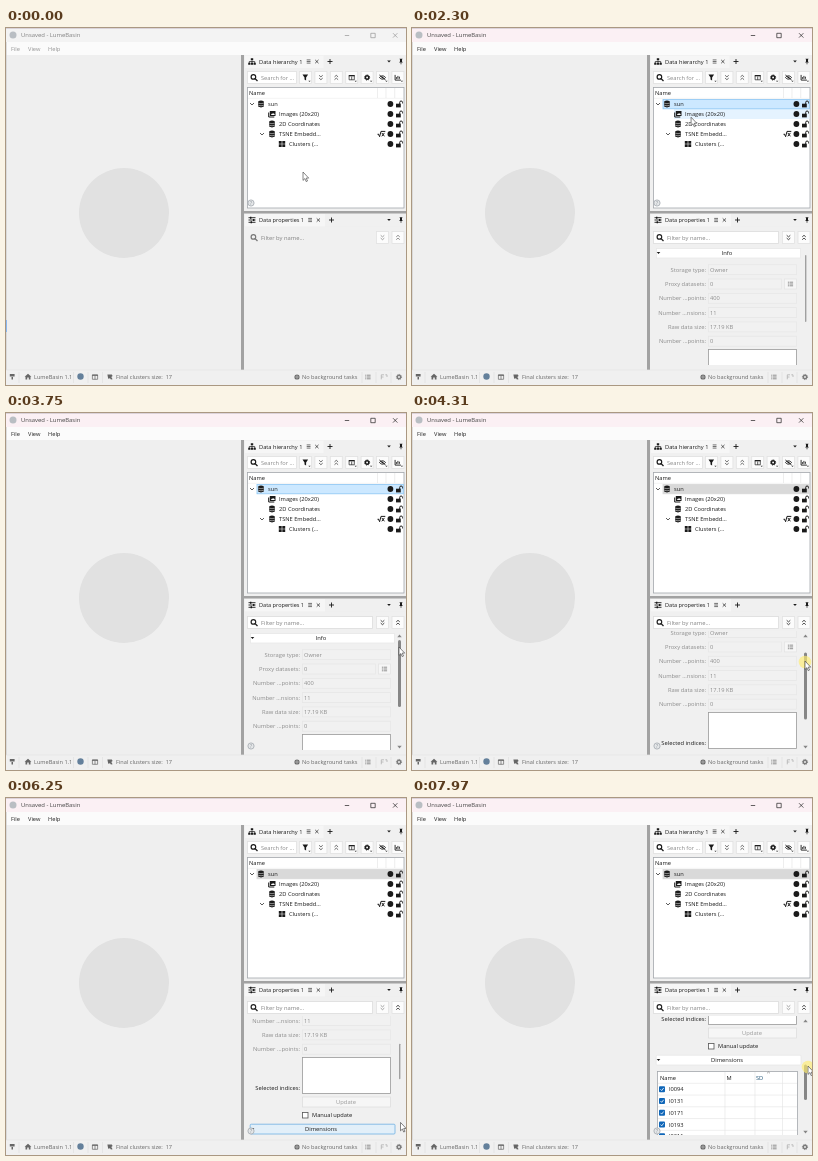
An HTML page for the animation above (8000 ms loop, 400 by 357 pixels).

```html
<!DOCTYPE html>
<html lang="en">
<head>
<meta charset="utf-8">
<title>Data viewer</title>
<style>
html, body { margin: 0; width: 100%; height: 100%; overflow: hidden; background: #f0f0f0; }
svg { display: block; width: 100%; height: 100%; --bar: #f3f3f3; --menu: #959595; --title: #808080; --act: #777; --field: #f0f0f0; --edge: #f0f0f0; }
svg.on { --bar: #fbf0f4; --menu: #222; --title: #444; --act: #222; --field: #fff; --edge: #dcdcdc; }
svg .live, svg.on .idle { display: none; }
svg.on .live { display: inline; }
text { font-family: "Open Sans", "Noto Sans", sans-serif; white-space: pre; }
</style>
</head>
<body>
<svg id="stage" viewBox="0 0 400 357" xmlns="http://www.w3.org/2000/svg"></svg>
<script>
const LOOP = 8000;
const VIEW = { top: 218, height: 119 };
const TRACK_TOP = 227;
const INK = '#1a1a1a', DIM = '#8c8c8c';

// ---- drawing helpers ----
const rect = (x, y, w, h, fill, stroke, more = '') => stroke
  ? `<rect x="${x + .5}" y="${y + .5}" width="${w - 1}" height="${h - 1}" style="fill:${fill};stroke:${stroke}" stroke-width=".8" ${more}/>`
  : `<rect x="${x}" y="${y}" width="${w}" height="${h}" style="fill:${fill}" ${more}/>`;
const text = (x, y, s, fill = INK, size = 5.7, anchor = 'start') =>
  `<text x="${x}" y="${y + 2.1}" font-size="${size}" text-anchor="${anchor}" style="fill:${fill}">${s}</text>`;
const path = (d, color = INK, width = 1, fill = 'none') =>
  `<path d="${d}" style="stroke:${color};fill:${fill}" stroke-width="${width}"/>`;
const shape = (d, color = INK) => `<path d="${d}" style="fill:${color}"/>`;
const dot = (x, y, r, fill = INK) => `<circle cx="${x}" cy="${y}" r="${r}" fill="${fill}"/>`;
const at = (x, y, body, more = '') => `<g transform="translate(${x} ${y})" ${more}>${body}</g>`;

// ---- icons, each centred on 0,0 ----
const icon = {
  search: c => `<circle cx="-.6" cy="-.6" r="2.3" fill="none" style="stroke:${c}" stroke-width="1.2"/>` + path('M1.1 1.1L3.5 3.5', c, 1.3),
  filter: c => shape('M-3-3H2.6L.6 0V3L-1 2V0Z', c),
  down: c => path('M-1.8-2.2L0-.6 1.8-2.2M-1.8 .6L0 2.2 1.8 .6', c, .8),
  up: c => path('M-1.8-.6L0-2.2 1.8-.6M-1.8 2.2L0 .6 1.8 2.2', c, .8),
  grid: c => path('M-2.6-2H2.6V2.3H-2.6ZM0-1V2.3', c, .7) + path('M-2.9-1.8H2.9', c, 1.2),
  cog: c => `<circle r="1.7" fill="none" style="stroke:${c}" stroke-width="1.5"/><circle r="2.6" fill="none" style="stroke:${c}" stroke-width=".9" stroke-dasharray="1.03 1.01"/>`,
  eye: c => path('M-3.1 0Q0-3.6 3.1 0Q0 3.6-3.1 0Z', c, .8) + `<circle r="1" style="fill:${c}"/>` + path('M-3.1-2.5L3.1 2.5', c, .9),
  chart: c => path('M-2.8-2.6V2.6H3', c, .9) + path('M-1.4 1.3V-.3M0 1.3V-1.6M1.5 1.3V-.8', c, .9),
  tree: c => shape('M-1.2-3.3H1.2V-1.2H-1.2ZM-3.8 1.2H-1.6V3.3H-3.8ZM-1.1 1.2H1.1V3.3H-1.1ZM1.6 1.2H3.8V3.3H1.6Z', c) + path('M0-1V1.5M-2.7 1.5V0H2.7V1.5', c, .7),
  sliders: c => path('M-3.5-2.3H3.5M-3.5 0H3.5M-3.5 2.3H3.5', c, .9) + shape('M-2-3.3H-.6V-1.3H-2ZM1-1H2.4V1H1ZM-1.4 1.3H0V3.3H-1.4Z', c),
  data: () => shape('M-2.9-2.4Q0-4.4 2.9-2.4V2.6Q0 4.2-2.9 2.6Z') + path('M-2.9-.9Q0 .3 2.9-.9M-2.9 1.2Q0 2.4 2.9 1.2', '#fff', .5),
  images: () => path('M-3.3-1.5V3H2.3', INK, 1) + shape('M-2.2-3H3.5V2H-2.2Z') + shape('M-1.2 1L.2-.8 1 .1 1.8-1 2.9 1Z', '#fff'),
  blocks: () => shape('M-3.2-2.9H-.3V-.3H-3.2ZM.3-2.9H3.2V-.3H.3ZM-3.2 .3H-.3V2.9H-3.2ZM.3 .3H3.2V2.9H.3Z'),
  lock: () => shape('M-3-.3H1.8V3.4H-3Z') + path('M.7 0V-1.6A1.4 1.4 0 0 1 3.5-1.6V-.6', INK, 1),
  pin: c => shape('M-1.5-2.8H1.5V-2.2H1V0L1.9 .9H-1.9L-1 0V-2.2H-1.5Z', c) + path('M0 1V2.8', c, .7),
  list: c => path('M-1-1.8H2.6M-1 0H2.6M-1 1.8H2.6', c, .7) + path('M-2.6-1.8H-1.7M-2.6 0H-1.7M-2.6 1.8H-1.7', c, .9),
  help: () => `<circle r="3.1" fill="#e4e6e8" stroke="#a3a9af" stroke-width=".8"/>` + text(0, 0, '?', '#858d95', 4.6, 'middle'),
  caret: c => shape('M-1.8-.9H1.8L0 1.1Z', c)
};
const put = (name, x, y, c = INK) => at(x, y, icon[name](c));
const button = (name, x, y, c = INK) => rect(x - 6.5, y - 6.5, 13, 13, '#fcfcfc', '#e2e2e2') + put(name, x, y, c);
const menuButton = (name, x, y) => button(name, x, y) + shape(`M${x + 2.8} ${y + 3.3}h2.4l-1.2 1.3Z`, '#444');

function frameParts() {
  let s = rect(0, 0, 400, 357, '#f0f0f0') + rect(0, 0, 400, 14, 'var(--bar)') + rect(0, 0, 400, .8, '#d5ccd4');
  s += dot(7, 7, 3.5, '#b9bec3') + text(15, 7, 'Unsaved - LumeBasin', 'var(--title)', 5.9);
  s += path('M338.8 7.5H343.2M364.8 5.3H369.2V9.7H364.8ZM387 5.2L391.4 9.6M391.4 5.2L387 9.6', 'var(--menu)', .7);
  s += rect(0, 14, 400, 13, '#fbfbfb');
  [[5, 'File'], [22, 'View'], [42, 'Help']].forEach(([x, m]) => s += text(x, 20.5, m, 'var(--menu)'));
  s += rect(0, 27, 235, 315, '#efefef') + dot(118, 185, 45, '#e1e1e1');
  s += rect(235, 27, 3, 315, '#a2a2a2') + rect(238, 183, 162, 3, '#a2a2a2');
  return s + rect(0, 14, .7, 343, '#d2d2d2') + rect(0, 292, 1, 12, '#8ab8f0', '', 'class="idle"');
}

function tabBar(y, mark, title, x) {
  return rect(238, y - 6.5, 162, 13, '#f0f0f0') + rect(239, y - 6, x + 15 - 239, 12.5, '#f6f6f6') +
    put(mark, 246, y) + text(253, y, title, INK, y < 100 ? 5.7 : 5.55) +
    path(`M${x - 1.8} ${y - 1.6}h3.8m-3.8 1.6h3.8m-3.8 1.6h3.8`, INK, .6) +
    path(`M${x + 6.7} ${y - 1.6}l3.3 3.3m0-3.3l-3.3 3.3`, INK, .7) +
    path(`M${x + 19} ${y}h5m-2.5-2.5v5`, INK, .9) + put('caret', 383, y) + put('pin', 395, y);
}

const rows = [
  ['data', 255, 'sun'], ['images', 266, 'Images (20x20)'], ['data', 266, '2D Coordinates'],
  ['data', 266, 'TSNE Embedd...'], ['blocks', 276, 'Clusters (...']
];
const rowY = i => 76 + i * 10;

function hierarchy() {
  const toolX = i => 299.5 + i * 15.4;
  let s = tabBar(33.5, 'tree', 'Data hierarchy 1', 302.5);
  s += rect(241, 43, 50, 13, '#fff', '#e0e0e0') + put('search', 248, 49.5) + text(255, 49.5, 'Search for ...', '#888');
  ['filter', 'down', 'up', 'grid', 'cog', 'eye', 'chart'].forEach((n, i) =>
    s += n === 'down' || n === 'up' ? button(n, toolX(i), 49.5, '#444') : menuButton(n, toolX(i), 49.5));
  s += rect(241, 59, 157.5, 121.5, '#fff', '#a3a7ac') + text(243, 65, 'Name');
  s += path('M242 70.3H397', '#ececec', .6) + path('M371.5 60V70M380 60V70M388.7 60V70', '#e2e2e2', .6);
  s += `<rect id="hover" height="10" fill="#e5f3ff"/>`;
  s += `<rect id="picked" class="live" x="251" y="71.4" width="146.3" height="9.4" stroke-width=".8"/>`;
  rows.forEach(([n, x, label], i) => {
    const y = rowY(i);
    s += put(n, x, y) + text(x + 7, y, label) + dot(384.4, y, 2.9) + put('lock', 393, y);
  });
  s += path('M244 75L246 77 248 75M254 105L256 107 258 105', '#333', .8);
  s += path('M371.5 106.3L372.4 106 373.6 108.7 375 103.4H379.3', INK, 1) + path('M375.8 104.9L378.4 108.3M378.4 104.9L375.8 108.3', INK, 1);
  return s + at(245, 175, icon.help(), 'id="helpTop"');
}

const fields = [['Storage type:', 'Owner'], ['Proxy datasets:', '0'], ['Number ...points:', '400'],
  ['Number ...nsions:', '11'], ['Raw data size:', '17.19 KB'], ['Number ...points:', '0']];
const dims = ['I0094', 'I0131', 'I0171', 'I0193', 'I0211', 'I0238', 'I0257', 'I0276', 'I0295', 'I0314', 'I0335'];

function form() {
  let s = rect(244, 220, 145, 10.5, '#fff', '#e8e8e8') + put('caret', 246.5, 225) + text(315, 225, 'Info', INK, 5.8, 'middle');
  fields.forEach(([label, value], i) => {
    const y = 241.7 + i * 14.3;
    s += text(294, y, label, DIM, 5.8, 'end') + rect(296, y - 5.5, i === 1 ? 74 : 89, 11, '#f1f1f1', '#e7e7e7') + text(298, y, value, DIM);
    if (i === 1) s += rect(372, y - 5.5, 13, 11, '#f6f6f6', '#e4e4e4') + put('list', 378.5, y, '#666');
  });
  s += text(294, 352, 'Selected indices:', INK, 5.8, 'end') + rect(296, 321, 89, 37, '#fff', '#9a9a9a');
  s += rect(296, 360.5, 89, 11, '#f6f6f6', '#dedede') + text(340, 366, 'Update', '#999', 5.8, 'middle');
  s += rect(296, 376, 6.5, 6.5, '#fff', '#555') + text(306, 379, 'Manual update');
  s += `<rect id="dimBar" x="244.2" y="388.2" width="144.8" height="9.8" rx="1" stroke-width=".8"/>` + text(315, 393, 'Dimensions', INK, 5.8, 'middle');
  return s + `<g id="table">${put('caret', 246.5, 393)}${table()}</g>`;
}

function table() {
  let s = rect(245, 404, 141, 146, '#fff', '#a3a7ac');
  s += text(248, 411, 'Name') + text(314.5, 411, 'M') + text(344, 411, 'SD', '#1b4f72') + path('M355 406.3L356.5 405 358 406.3', '#777', .6);
  dims.forEach((d, i) => {
    const y = 422.3 + i * 11.75;
    s += path(`M246 ${y - 6}H385`, '#e2e2e2', .6) + rect(247, y - 3, 6, 6, '#0f66b8', '', 'rx="1"');
    s += path(`M248.5 ${y}l1.2 1.3 2-2.6`, '#fff', .8) + text(257, y, d);
  });
  return s + path('M313 405V549M343 405V549M370.5 405V549', '#e2e2e2', .6);
}

function properties() {
  let s = tabBar(192, 'sliders', 'Data properties 1', 304);
  s += rect(241, 203, 126, 13, 'var(--field)', 'var(--edge)') + put('search', 248, 209.5, 'var(--act)') + text(255, 209.5, 'Filter by name...', '#808080', 5.8);
  s += button('down', 376.5, 209.5, 'var(--expand)') + button('up', 392, 209.5, 'var(--act)');
  s += `<g class="live"><g clip-path="url(#port)"><g id="form">${form()}</g></g>`;
  s += `<rect id="thumb"/>`;
  s += `<g id="arrows">${shape('M391.3 224.3H395.7L393.5 221.5Z', '#858585')}${shape('M391.3 332.7H395.7L393.5 335.5Z', '#858585')}</g></g>`;
  return s + at(245, 333, icon.help(), 'id="helpLow"');
}

function statusBar() {
  const c = '#666';
  let s = rect(0, 342, 400, 15, '#f0f0f0') + path('M0 342H400', '#e2e2e2', .7);
  s += shape('M3.8 346H8.6V348.6H3.8ZM5.5 349H7V351.6H5.5Z', c);
  s += shape('M18.6 348.8L22 345.7 25.4 348.8H24.5V351.6H22.8V349.6H21.2V351.6H19.5V348.8Z', c) + text(28, 349, 'LumeBasin 1.1', c, 5.6);
  s += dot(74.5, 348.5, 3.2, '#64809b') + put('grid', 89, 349, c);
  s += at(104, 349, shape('M-2.6-2.6H1.8L2.6-.9 1.3 0 2.6 2.2 .9 2.6 0 1.3-1.8 1.8Z', c)) + text(110, 349, 'Final clusters size:  17', c, 5.6);
  s += dot(291, 349, 2.6, c) + path('M288.5 349H293.5M291 346.4V351.6', '#ddd', .5) + text(296, 349, 'No background tasks', c, 5.65);
  s += put('list', 362, 349, c) + path('M375.3 346.8V351.3M375.3 346.8H378M375.3 349H377.5M379.3 346.8H381V349', '#aaa', .7);
  s += at(393, 349, icon.cog(c), 'opacity=".85"');
  return s + path('M13 344V355M67.5 344V355M82 344V355M96.5 344V355M356 344V355M370 344V355M385 344V355', '#e0e0e0', .7);
}

const stage = document.getElementById('stage');
stage.innerHTML = `<defs><clipPath id="port"><rect x="240" y="${VIEW.top}" width="151" height="${VIEW.height}"/></clipPath></defs>` +
  frameParts() + hierarchy() + properties() + statusBar() +
  '<circle id="press" r="6.3" fill="#ffec6e" fill-opacity=".65"/>' +
  '<path id="cursor" d="M0 0V8.4L1.9 6.6 3.2 9.6 4.5 9 3.2 6.1H5.7Z" fill="#fff" stroke="#444" stroke-width=".65"/>';
const el = id => document.getElementById(id);
const show = (id, yes) => el(id).setAttribute('visibility', yes ? 'visible' : 'hidden');
const set = (id, attrs) => Object.entries(attrs).forEach(([k, v]) => el(id).setAttribute(k, v));

// ---- motion: [time, value...] ----
const pointer = [
  [0, 297, 144], [70, 297, 144], [130, 295, 143.5], [400, 295, 143.5], [1100, 272, 76], [2230, 272, 76],
  [2300, 279, 89], [3060, 340, 268], [3140, 340, 268], [3750, 393, 234], [3890, 393, 234], [4310, 393, 248],
  [4660, 393, 272], [4730, 393, 272], [5010, 393, 284], [5210, 393, 284], [5350, 339, 325], [5980, 318, 334],
  [6050, 318, 334], [6250, 394.5, 324.5], [6810, 395, 247], [6870, 395, 247], [7560, 396, 262], [7690, 396, 262], [7970, 396, 268]
];
const scrolling = [[0, 0], [3890, 0], [4310, 22], [4660, 62], [6870, 62], [7560, 113], [7690, 113], [7970, 131]];
const presses = [[1330, 1480], [3860, 4730], [5990, 6120], [6840, LOOP]];
const barHovers = [[3600, 5500], [6600, LOOP]];
const during = (spans, t) => spans.some(([a, b]) => t >= a && t < b);

// Smooth curve through the keys that never overshoots them.
function follow(keys, t, c) {
  const n = keys.length - 1;
  if (t >= keys[n][0]) return keys[n][c];
  let i = 0;
  while (t >= keys[i + 1][0]) i++;
  const slope = k => k < 0 || k >= n ? 0 : (keys[k + 1][c] - keys[k][c]) / (keys[k + 1][0] - keys[k][0]);
  const tangent = k => {
    const a = slope(k - 1), b = slope(k);
    return a * b > 0 ? 2 * a * b / (a + b) : 0;
  };
  const [a, b] = [keys[i], keys[i + 1]], d = b[0] - a[0], u = (t - a[0]) / d, v = 1 - u;
  return a[c] * (1 + 2 * u) * v * v + b[c] * u * u * (3 - 2 * u) + d * u * v * (v * tangent(i) - u * tangent(i + 1));
}

function draw(t) {
  const x = follow(pointer, t, 1), y = follow(pointer, t, 2), scroll = follow(scrolling, t, 1);
  const active = t >= 1400, open = t >= 6120, overDims = t >= 5420 && t < 6320, blurred = t >= 3900;
  stage.classList.toggle('on', active);
  stage.style.setProperty('--expand', active && !open ? INK : '#888');

  const index = Math.floor((y - 71) / 10), row = x > 250 && x < 390 && rows[index];
  show('hover', row);
  if (row) set('hover', { x: row[1] - 4, y: rowY(index) - 5, width: 401.5 - row[1] });
  set('picked', blurred ? { fill: '#d9d9d9', stroke: '#d9d9d9' } : { fill: '#cce8ff', stroke: '#8cc6f3' });
  show('helpTop', y > 42 && y < 183);
  show('helpLow', y > 186);

  const ratio = open ? .301 : .565, wide = during(barHovers, t);
  set('form', { transform: `translate(0 ${-scroll})` });
  set('thumb', { y: TRACK_TOP + scroll * ratio, height: open ? 35.5 : 67 });
  set('thumb', wide ? { x: 392, width: 3, rx: 1.5, fill: '#868686' } : { x: 393, width: 1.4, rx: .7, fill: '#a0a0a0' });
  el('arrows').style.display = wide ? '' : 'none';
  set('dimBar', overDims ? { fill: '#e2eff9', stroke: '#6fb0e2' } : { fill: '#fff', stroke: '#e8e8e8' });
  el('table').style.display = open ? '' : 'none';

  show('press', during(presses, t));
  set('press', { cx: x, cy: y + 1 });
  set('cursor', { transform: `translate(${x} ${y})` });
}

const start = performance.now();
function tick() {
  draw((performance.now() - start) % LOOP);
  requestAnimationFrame(tick);
}
tick();
</script>
</body>
</html>
```
